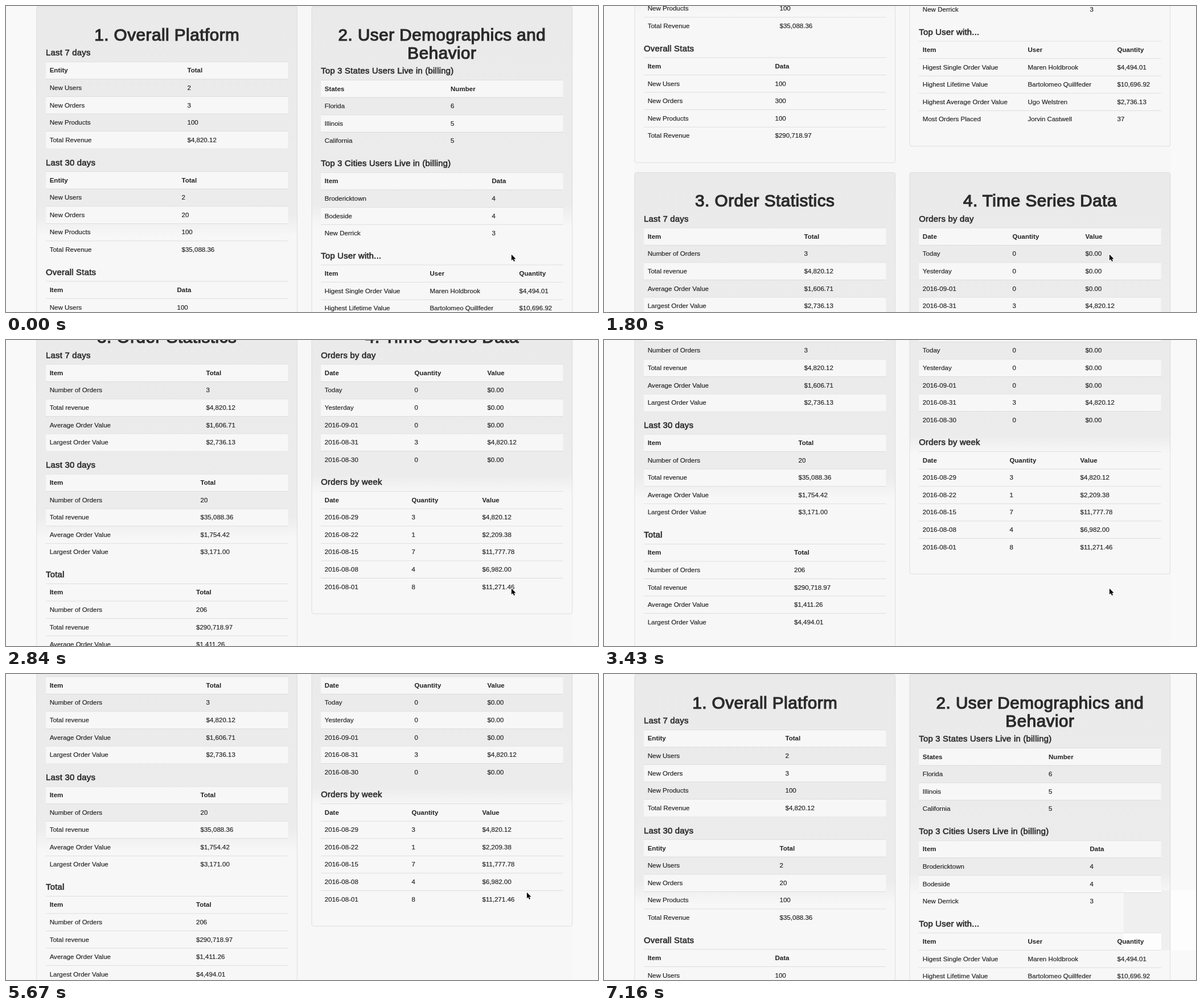
Animation, 1040 px wide and 539 px high, one loop 8.44 s. Source, as an HTML page:

```html
<!DOCTYPE html>
<html lang="en">
<head>
<meta charset="utf-8">
<title>Dashboard</title>
<style>
html, body { margin: 0; width: 100%; height: 100%; overflow: hidden; background: #f9f9f9; }
svg { display: block; }
text { font-family: "Liberation Sans", Arial, sans-serif; font-size: 14px; fill: #222; white-space: pre; }
.td { stroke: #222; stroke-width: .2px; }
.th { font-weight: 700; }
.h1, .h4 { fill: #2b2b2b; stroke: #2b2b2b; letter-spacing: .016em; }
.h1 { font-size: 36px; stroke-width: 1.5px; text-anchor: middle; }
.h4 { font-size: 18px; stroke-width: .75px; }
</style>
</head>
<body>
<svg id="stage" width="1040" height="539" viewBox="0 0 1040 539">
  <defs>
    <linearGradient id="well" x1="0" y1="0" x2="0" y2="1">
      <stop offset="0" stop-color="#eaeaea"/>
      <stop offset=".545" stop-color="#ececec"/>
      <stop offset=".604" stop-color="#f7f7f7"/>
      <stop offset="1" stop-color="#f7f7f7"/>
    </linearGradient>
  </defs>
  <rect width="1040" height="539" fill="#f9f9f9"/>
  <rect x="54" width="941" height="539" fill="#f7f7f7"/>
  <g id="base"></g>
  <g id="patchA">
    <rect x="885" y="381" width="40" height="36" fill="#f3f3f3"/>
    <rect x="885" y="418" width="40" height="35" fill="#fff"/>
  </g>
  <g id="patchB">
    <rect x="913" y="381" width="82" height="105.5" fill="#efefef"/>
    <rect x="913" y="381" width="66" height="3.5" fill="#fdfdfd"/>
    <rect x="913" y="456" width="66" height="30.5" fill="#fdfdfd"/>
    <rect x="995.5" y="381" width="44.5" height="106" fill="#fdfdfd"/>
  </g>
  <g id="ink"></g>
  <path id="cursor" d="M0 0V10.6L2.4 8.4 4.2 12.4 6 11.6 4.3 7.7H7.6Z" fill="#000" stroke="#fff" stroke-width="1.8" paint-order="stroke"/>
</svg>
<script>
const SCALE = 0.826, LEFT = 53.5, TOP = 0.5, LOOP = 8440;
const ROW = 37, WIDTH = 555, PAD = 20;
const $ = id => document.getElementById(id);
const base = $("base"), ink = $("ink");

function add(parent, tag, attrs, content) {
  const el = document.createElementNS("http://www.w3.org/2000/svg", tag);
  for (const key in attrs) el.setAttribute(key, attrs[key]);
  if (content) el.textContent = content;
  parent.appendChild(el);
}
const label = (cls, x, y, str) => add(ink, "text", { class: cls, x, y }, str);

// Layout is in CSS pixels of the page; each row is "cell|cell|...".
const panels = [
  { x: 0, y: 0, title: ["1. Overall Platform"], tables: [
    { name: "Last 7 days", cols: [28, 320.8], rows: ["Entity|Total", "New Users|2", "New Orders|3",
      "New Products|100", "Total Revenue|$4,820.12"] },
    { name: "Last 30 days", cols: [28, 308.7], rows: ["Entity|Total", "New Users|2", "New Orders|20",
      "New Products|100", "Total Revenue|$35,088.36"] },
    { name: "Overall Stats", cols: [28, 299], rows: ["Item|Data", "New Users|100", "New Orders|300",
      "New Products|100", "Total Revenue|$290,718.97"] }
  ] },
  { x: 585, y: 0, title: ["2. User Demographics and", "Behavior"], tables: [
    { name: "Top 3 States Users Live in (billing)", cols: [28, 295.8],
      rows: ["States|Number", "Florida|6", "Illinois|5", "California|5"] },
    { name: "Top 3 Cities Users Live in (billing)", cols: [28, 383.5],
      rows: ["Item|Data", "Brodericktown|4", "Bodeside|4", "New Derrick|3"] },
    { name: "Top User with...", cols: [28, 251.6, 441.6], rows: ["Item|User|Quantity",
      "Higest Single Order Value|Maren Holdbrook|$4,494.01",
      "Highest Lifetime Value|Bartolomeo Quillfeder|$10,696.92",
      "Highest Average Order Value|Ugo Welstren|$2,736.13",
      "Most Orders Placed|Jorvin Castwell|37"] }
  ] },
  { x: 0, y: 831, title: ["3. Order Statistics"], tables: [
    { name: "Last 7 days", cols: [28, 360.8], rows: ["Item|Total", "Number of Orders|3",
      "Total revenue|$4,820.12", "Average Order Value|$1,606.71", "Largest Order Value|$2,736.13"] },
    { name: "Last 30 days", cols: [28, 348.7], rows: ["Item|Total", "Number of Orders|20",
      "Total revenue|$35,088.36", "Average Order Value|$1,754.42", "Largest Order Value|$3,171.00"] },
    { name: "Total", cols: [28, 339.6], rows: ["Item|Total", "Number of Orders|206",
      "Total revenue|$290,718.97", "Average Order Value|$1,411.26", "Largest Order Value|$4,494.01"] }
  ] },
  { x: 585, y: 831, title: ["4. Time Series Data"], tables: [
    { name: "Orders by day", cols: [28, 218.9, 373.9], rows: ["Date|Quantity|Value", "Today|0|$0.00",
      "Yesterday|0|$0.00", "2016-09-01|0|$0.00", "2016-08-31|3|$4,820.12", "2016-08-30|0|$0.00"] },
    { name: "Orders by week", cols: [28, 212.8, 363], rows: ["Date|Quantity|Value",
      "2016-08-29|3|$4,820.12", "2016-08-22|1|$2,209.38", "2016-08-15|7|$11,777.78",
      "2016-08-08|4|$6,982.00", "2016-08-01|8|$11,271.46"] }
  ] }
];

function drawTable(table, x, y) {
  table.rows.forEach((row, i) => {
    const top = y + i * ROW, box = { x: x + PAD, y: top, width: WIDTH - 2 * PAD };
    if (i % 2 === 0) add(base, "rect", { ...box, height: ROW, fill: "#f7f7f7" });
    add(ink, "rect", { ...box, height: 1, fill: "#d9d9d9" });
    row.split("|").forEach((cell, c) =>
      label(i ? "td" : "th", x + table.cols[c], top + 23.6, cell));
  });
}

function drawPanel({ x, y, title, tables }) {
  const listTop = y + 2 * PAD + 39 * title.length + 10;
  const height = tables.reduce((sum, t) => sum + 29 + t.rows.length * ROW + PAD, listTop - y) + PAD;
  add(base, "rect", { x, y, width: WIDTH, height, rx: 4, fill: "url(#well)" });
  add(ink, "rect", { x: x + .5, y: y + .5, width: WIDTH - 1, height: height - 1, rx: 4,
    fill: "none", stroke: "#dadada" });
  title.forEach((line, i) => label("h1", x + WIDTH / 2, y + 72.8 + 39 * i, line));
  let top = listTop;
  for (const table of tables) {
    label("h4", x + PAD, top + 16, table.name);
    drawTable(table, x, top + 29);
    top += 29 + table.rows.length * ROW + PAD;
  }
}
panels.forEach(drawPanel);

// [time, scroll offset]: the view jumps at each time and holds.
const scrolls = [
  [0, 0], [600, 20], [750, 90], [900, 178], [1050, 259], [1200, 312], [1350, 340], [1500, 350],
  [1650, 360], [1800, 394], [1950, 452], [2100, 525], [2250, 592], [2400, 645], [2550, 683], [2690, 718],
  [2840, 742], [2990, 767], [3140, 788], [3290, 803], [3430, 812], [4330, 811], [4630, 807],
  [5530, 780], [5680, 685], [5830, 530], [5980, 360], [6120, 207], [6270, 75], [6420, 0]
];
// [time, x, y] of the pointer tip
const pointer = [
  [0, 888, 437.7], [4930, 903, 409.7], [5080, 915, 384.7],
  [6870, 946, 414], [7010, 1004, 456], [7160, 1060, 490]
];
const at = (steps, t) => steps.findLast(step => step[0] <= t);
const show = (id, on) => $(id).setAttribute("visibility", on ? "visible" : "hidden");

function render(t) {
  const place = `translate(${LEFT} ${TOP - at(scrolls, t)[1]}) scale(${SCALE})`;
  base.setAttribute("transform", place);
  ink.setAttribute("transform", place);
  const [, x, y] = at(pointer, t);
  $("cursor").setAttribute("transform", `translate(${x} ${y})`);
  show("patchA", t >= 4930 && t < 5530);
  show("patchB", t >= 6870);
}

const start = performance.now();
function tick() {
  render((performance.now() - start) % LOOP);
  requestAnimationFrame(tick);
}
tick();
</script>
</body>
</html>
```
